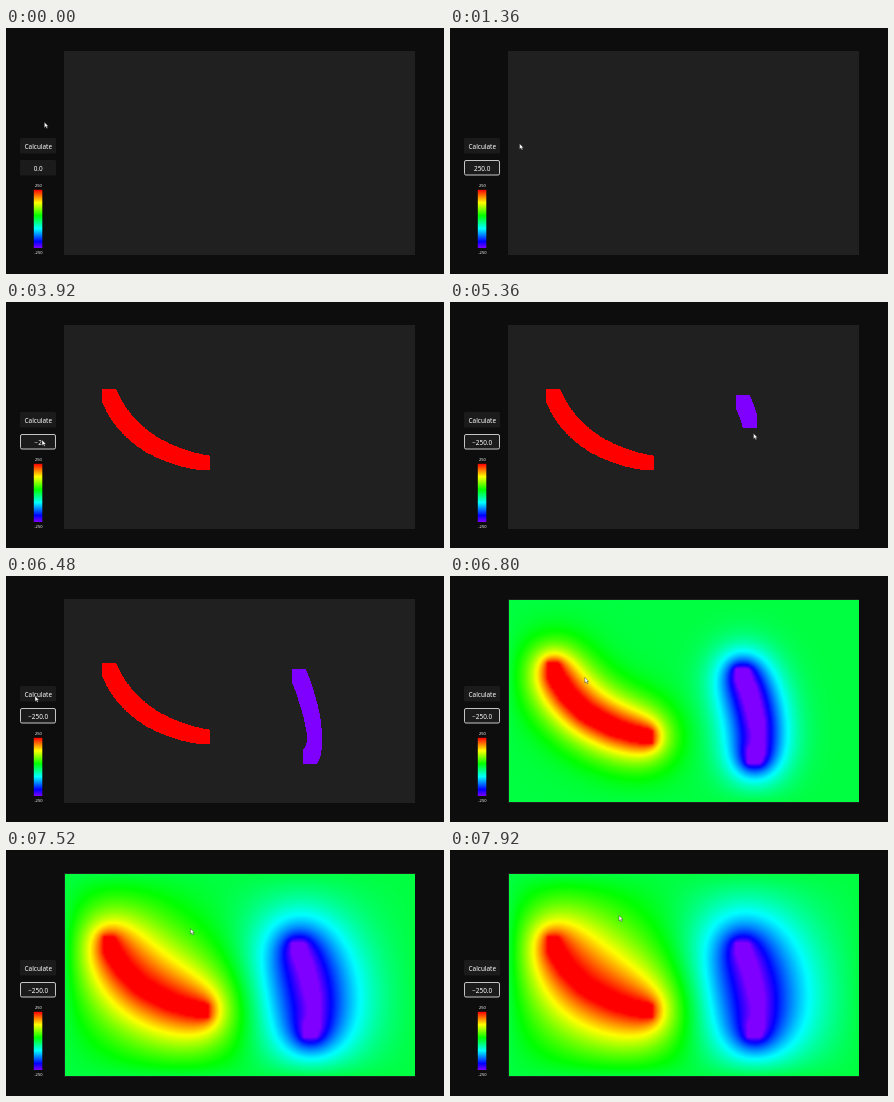
Animation of 438 by 246 pixels, one loop 8 s. Source, as an HTML page with a canvas:

```html
<!DOCTYPE html>
<html lang="en">
<head>
<meta charset="utf-8">
<title>Heat diffusion</title>
<style>
  html, body { margin: 0; width: 100%; height: 100%; overflow: hidden; background: #0d0d0d; }
  canvas, svg { position: absolute; left: 0; top: 0; width: 438px; height: 246px; }
  text { font-family: "Noto Sans", "Open Sans", sans-serif; font-size: 6.4px; fill: #fff; text-anchor: middle; }
  .small { font-size: 4px; }
</style>
</head>
<body>
<canvas id="stage" width="438" height="246"></canvas>
<svg viewBox="0 0 438 246">
  <defs><linearGradient id="scale" x1="0" y1="0" x2="0" y2="1"></linearGradient></defs>
  <rect x="14" y="110" width="36" height="15.5" rx="1.5" fill="#1b1b1b"/>
  <text x="32.3" y="120.7">Calculate</text>
  <rect x="14" y="132" width="36" height="15.5" rx="1.5" fill="#1b1b1b"/>
  <rect id="focus" x="14.5" y="132.5" width="35" height="14.5" rx="1.5" fill="none" stroke="#c4c4c4"/>
  <text id="value" x="32.2" y="142.6">0.0</text>
  <text class="small" x="32.4" y="158.9">250</text>
  <rect x="27.8" y="161.8" width="8.5" height="58.2" fill="url(#scale)"/>
  <text class="small" x="32.4" y="226.4">-250</text>
  <path id="cursor" d="M0 0V5.4L1.3 4.2L2.3 6.2L3.2 5.8L2.3 3.9H4Z" fill="#fff" stroke="#222" stroke-width="0.4"/>
</svg>
<script>
const LOOP = 8000;
const MAX = 250;
const BRUSH = 6.8;
const $ = id => document.getElementById(id);
const ctx = $('stage').getContext('2d');
const clamp01 = v => Math.max(0, Math.min(1, v));
const mix = (a, b, k) => a + (b - a) * k;

// Bezier curve of any degree
function curve(points, k) {
  if (points.length === 1) return points[0];
  const inner = points.slice(1).map(([x, y], i) => [mix(points[i][0], x, k), mix(points[i][1], y, k)]);
  return curve(inner, k);
}

// Colour scale: red at +MAX through to violet at -MAX
const hueOf = temp => (MAX - temp) / (2 * MAX) * 270;
for (let i = 0; i <= 18; i++) {
  const stop = document.createElementNS('http://www.w3.org/2000/svg', 'stop');
  stop.setAttribute('offset', i / 18);
  stop.setAttribute('stop-color', `hsl(${i * 15} 100% 50%)`);
  $('scale').append(stop);
}

const DABS = 120;
const strokes = [
  { temp: MAX, color: '#f00', start: 1800, end: 2360,
    points: [[103, 93.6], [118.7, 129.9], [150, 152.2], [197, 160.5]] },
  { temp: -MAX, color: '#7f00ff', start: 5270, end: 5680,
    points: [[292.7, 99.6], [304, 127], [315, 168], [303.7, 180.5]] }
];
for (const s of strokes) {
  s.dabs = Array.from({ length: DABS + 1 }, (_, i) => curve(s.points, i / DABS));
}

// Heat equation on a grid with cold edges and held strokes
const CELL = 2, COLS = 175, ROWS = 101, LEFT = 59, TOP = 24;
const W = COLS + 2;
const HEAT_START = 6490, STEPS_PER_MS = 1.1;
const held = new Float32Array(W * (ROWS + 2));
const free = [];
for (let r = 1; r <= ROWS; r++) {
  for (let c = 1; c <= COLS; c++) {
    const x = LEFT + (c - 0.5) * CELL, y = TOP + (r - 0.5) * CELL;
    const hit = strokes.find(s => s.dabs.some(d =>
      Math.abs(d[0] - x) < BRUSH && Math.abs(d[1] - y) < BRUSH));
    if (hit) held[r * W + c] = hit.temp;
    else free.push(r * W + c);
  }
}
let heat, next, stepsDone;
function resetHeat() {
  heat = held.slice();
  next = held.slice();
  stepsDone = 0;
}
resetHeat();

function advanceHeat(target) {
  if (target < stepsDone) resetHeat();
  for (; stepsDone < target; stepsDone++) {
    for (const i of free) next[i] = (heat[i - 1] + heat[i + 1] + heat[i - W] + heat[i + W]) / 4;
    [heat, next] = [next, heat];
  }
}

const heatCanvas = document.createElement('canvas');
heatCanvas.width = COLS;
heatCanvas.height = ROWS;
const heatCtx = heatCanvas.getContext('2d');
const image = heatCtx.createImageData(COLS, ROWS);

function channel(hue, offset) {
  const k = (offset + hue / 60) % 6;
  return 255 * (1 - clamp01(Math.min(k, 4 - k)));
}

function drawHeat(t) {
  advanceHeat(1 + Math.floor((t - HEAT_START) * STEPS_PER_MS));
  for (let r = 0, p = 0; r < ROWS; r++) {
    for (let c = 0; c < COLS; c++) {
      const hue = hueOf(heat[(r + 1) * W + c + 1]);
      for (const offset of [5, 3, 1]) image.data[p++] = channel(hue, offset);
      image.data[p++] = 255;
    }
  }
  heatCtx.putImageData(image, 0, 0);
  ctx.drawImage(heatCanvas, LEFT, TOP, COLS * CELL, ROWS * CELL);
}

function drawStroke(s, t) {
  if (t < s.start) return;
  const done = clamp01((t - s.start) / (s.end - s.start));
  ctx.fillStyle = s.color;
  for (const [x, y] of s.dabs.slice(0, 1 + Math.floor(done * DABS))) {
    ctx.fillRect(Math.round(x - BRUSH), Math.round(y - BRUSH), 14, 14);
  }
}

// Pointer moves; it rests where the last one ended and runs ahead of the paint
const field = [36, 138], button = [29, 120];
const [warm, cold] = strokes.map(s => s.points);
const moves = [
  { start: 0, end: 160, path: [[38.4, 94], field] },
  { start: 960, end: 1760, path: [field, warm[0]] },
  { start: 1800, end: 2340, path: warm },
  { start: 2420, end: 3200, path: [warm[3], [110, 205], field] },
  { start: 4480, end: 5240, path: [field, cold[0]] },
  { start: 5270, end: 5530, path: cold },
  { start: 5680, end: 6240, path: [cold[3], [250, 225], button] },
  { start: 6560, end: 6800, path: [button, [134.5, 101.5]] },
  { start: 6800, end: 7120, path: [[134.5, 101.5], [200, 92]] },
  { start: 7120, end: 7920, path: [[200, 92], [169, 65.5]] }
];
function pointerAt(t) {
  const { start, end, path } = moves.findLast(m => m.start <= t);
  return curve(path, clamp01((t - start) / (end - start)));
}

const KEY_MS = 160;
const entries = [{ start: 400, text: '250' }, { start: 3680, text: '\u2212250' }];
function valueAt(t) {
  const entry = entries.findLast(e => e.start <= t);
  if (!entry) return '0.0';
  const keys = 1 + Math.floor((t - entry.start) / KEY_MS);
  return keys > entry.text.length ? entry.text + '.0' : entry.text.slice(0, keys);
}

function render(t) {
  ctx.fillStyle = '#0d0d0d';
  ctx.fillRect(0, 0, 438, 246);
  ctx.fillStyle = '#202020';
  ctx.fillRect(58, 23, 351, 204);
  if (t >= HEAT_START) drawHeat(t);
  else strokes.forEach(s => drawStroke(s, t));

  $('focus').style.visibility = t < 240 ? 'hidden' : 'visible';
  $('value').textContent = valueAt(t);
  $('cursor').setAttribute('transform', `translate(${pointerAt(t)})`);
}

const began = performance.now();
function frame() {
  render((performance.now() - began) % LOOP);
  requestAnimationFrame(frame);
}
render(0);
requestAnimationFrame(frame);
</script>
</body>
</html>
```
